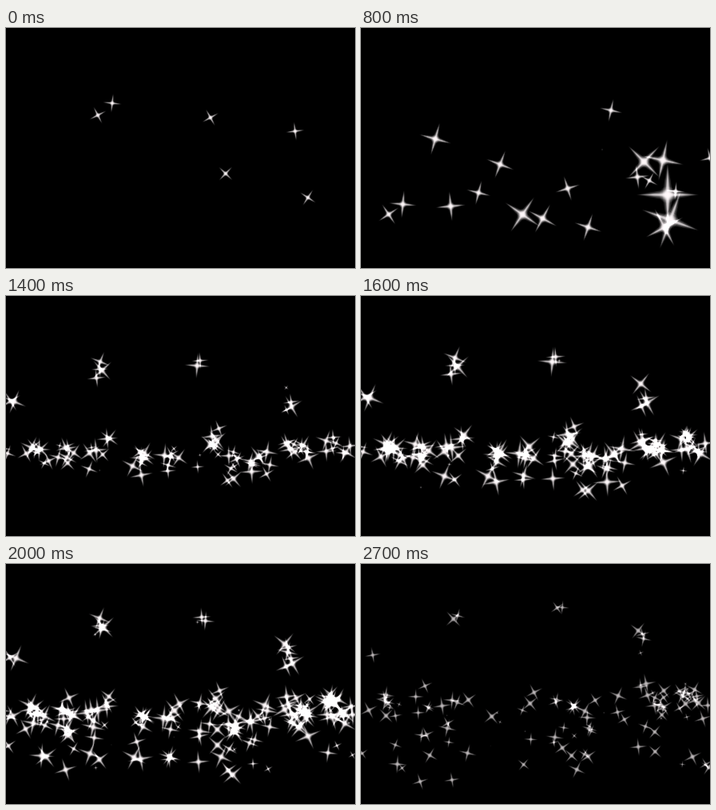
Animation of 437x300 px, one loop 2.8 s. Source, as an HTML page with a canvas:

```html
<!DOCTYPE html>
<html lang="en">
<head>
<meta charset="utf-8">
<title>Twinkling stars</title>
<style>
html, body { margin: 0; width: 100%; height: 100%; overflow: hidden; background: #000; }
canvas { display: block; width: 437px; height: 300px; }
</style>
</head>
<body>
<canvas id="sky" width="437" height="300"></canvas>
<script>
const LOOP = 2800, STEP = 100, W = 437, H = 300;
const ctx = document.getElementById('sky').getContext('2d');
ctx.imageSmoothingQuality = 'high';

let seed = 71;
const rand = (a = 0, b = 1) => {
  seed = (seed * 16807) % 2147483647;
  return a + (b - a) * seed / 2147483647;
};
const bell = spread => (rand(-1, 1) + rand(-1, 1)) * spread;
const unit = v => Math.max(0, Math.min(1, v));

// Piecewise linear curve through [time, value] points
function curve(pts, t) {
  const i = pts.findIndex(p => t <= p[0]);
  if (i === 0) return pts[0][1];
  if (i < 0) return pts[pts.length - 1][1];
  const [t0, v0] = pts[i - 1], [t1, v1] = pts[i];
  return v0 + (v1 - v0) * (t - t0) / (t1 - t0);
}

// Soft four-armed star, drawn once and then scaled and turned
function makeStar(half) {
  const c = document.createElement('canvas');
  c.width = c.height = half * 2;
  const g = c.getContext('2d');
  g.translate(half, half);
  const glow = (r, stops) => {
    const grad = g.createRadialGradient(0, 0, 0, 0, 0, r);
    stops.forEach(([p, a]) => grad.addColorStop(p, `rgba(255,248,250,${a})`));
    return grad;
  };
  for (const [w, a] of [[0.16, 0.18], [0.1, 0.28], [0.06, 0.5], [0.03, 0.6]]) {
    g.fillStyle = glow(half, [[0, a], [0.45, a * 0.8], [0.75, a * 0.4], [1, 0]]);
    for (let i = 0; i < 4; i++) {
      g.beginPath();
      g.moveTo(0, -w * half);
      g.quadraticCurveTo(half * 0.45, -w * half * 0.6, half, 0);
      g.quadraticCurveTo(half * 0.45, w * half * 0.6, 0, w * half);
      g.fill();
      g.rotate(Math.PI / 2);
    }
  }
  g.fillStyle = glow(half * 0.27, [[0, 1], [0.35, 0.85], [0.65, 0.3], [1, 0]]);
  g.fillRect(-half, -half, half * 2, half * 2);
  return c;
}
const sprite = makeStar(64);

function drawStar(x, y, r, deg, alpha = 1) {
  if (r < 0.6) return;
  const R = r * 1.12;
  ctx.save();
  ctx.globalAlpha = alpha;
  ctx.translate(x, y);
  ctx.rotate(deg * Math.PI / 180);
  ctx.drawImage(sprite, -R, -R, R * 2, R * 2);
  ctx.restore();
}

// Large stars that fly apart: place at 0 ms, place at 400 ms, turn
const flyers = [
  [133, 94, 123, 54, 6],
  [115, 109, 82, 227, -27],
  [256, 112, 177, 53, -29],
  [275, 182, 318, 124, 44],
  [362, 129, 419, 103, -7],
  [378, 212, 437, 255, 33]
];
const FLY_SIZE = [[0, 11], [400, 36], [480, 36], [760, 0]];

// Stars that follow: place, radius and turn at 400 ms
const followers = [
  [334, 157, 37, 18], [438, 155, 26, -14], [397, 272, 38, 45], [370, 180, 14, 45],
  [399, 169, 15, 12], [401, 224, 15, -28], [368, 207, 4, 0], [381, 230, 5, 20]
].map(([x, y, r, deg]) => ({
  x, y, deg, born: 400 - r * 10, vx: rand(-0.08, 0.04), vy: rand(-0.06, 0.08)
}));
const FOLLOW_SIZE = [[0, 0], [400, 40], [780, 0]];

// A short sweep of stars from right to left
const sweep = Array.from({ length: 14 }, (_, i) => ({
  x: 410 - i * 29, y: rand(95, 245), deg: rand(-45, 45),
  vx: rand(-0.06, 0.02), vy: rand(-0.06, 0.06), born: 420 + i * 17, r: rand(16, 26)
}));
const SWEEP_SIZE = [[0, 0], [260, 1], [500, 0]];

// Dust sources: x, y at 1200 ms, number of stars
const sources = [
  [6, 144, 3], [117, 98, 6], [244, 88, 4], [353, 130, 6],
  [2, 196, 4], [33, 192, 11], [47, 203, 8], [75, 196, 15], [107, 202, 12],
  [124, 188, 7], [167, 202, 11], [208, 201, 11], [239, 194, 6], [262, 180, 13],
  [283, 204, 15], [308, 203, 7], [330, 200, 6], [356, 183, 11], [373, 191, 17],
  [409, 183, 18], [427, 195, 10]
];

function makeSpeck(x, y) {
  const top = y < 150;
  const born = 800 + 1400 * rand() ** 1.6;
  return {
    x: x + bell(top ? 4 : 6),
    y: y + bell(top ? 10 : 8),
    deg: rand(-45, 45),
    vx: rand(-0.003, 0.004),
    rise: top ? 0.024 : rand(0.006, 0.022),
    fall: !top && rand() < 0.4 ? 85 * rand() ** 1.4 : 0,
    born, end: born + rand(1200, 1800), size: rand(0.65, 1)
  };
}
const specks = sources.flatMap(([x, y, n]) =>
  Array.from({ length: n }, () => makeSpeck(x, y)));

const SIZE = [[800, 4], [1200, 12.5], [1600, 18], [2000, 17], [2300, 14.5], [2700, 12.5]];
const SHINE = [[2100, 1], [2300, 0.95], [2700, 0.75]];

function drawSpeck(s, t) {
  const d = t - 1200;
  const drop = s.fall ? s.fall * (1 - Math.exp(-d / 700)) : -s.rise * d;
  const grow = unit((t - s.born) / 300) * unit((s.end - t) / 300);
  drawStar(s.x + s.vx * d, s.y + drop, curve(SIZE, t) * s.size * grow, s.deg, curve(SHINE, t));
}

function draw(t) {
  ctx.globalCompositeOperation = 'source-over';
  ctx.fillStyle = '#000';
  ctx.fillRect(0, 0, W, H);
  ctx.globalCompositeOperation = 'lighter';

  for (const [x0, y0, x1, y1, deg] of flyers) {
    const p = t / 400;
    drawStar(x0 + (x1 - x0) * p, y0 + (y1 - y0) * p, curve(FLY_SIZE, t), deg);
  }
  for (const s of followers) {
    const d = t - 400;
    drawStar(s.x + s.vx * d, s.y + s.vy * d, curve(FOLLOW_SIZE, t - s.born), s.deg);
  }
  for (const s of sweep) {
    const age = t - s.born;
    drawStar(s.x + s.vx * age, s.y + s.vy * age, s.r * curve(SWEEP_SIZE, age), s.deg);
  }
  for (const s of specks) drawSpeck(s, t);
}

const start = performance.now();
function tick() {
  const t = (performance.now() - start) % LOOP;
  draw(Math.floor(t / STEP) * STEP);
  requestAnimationFrame(tick);
}
tick();
</script>
</body>
</html>
```
